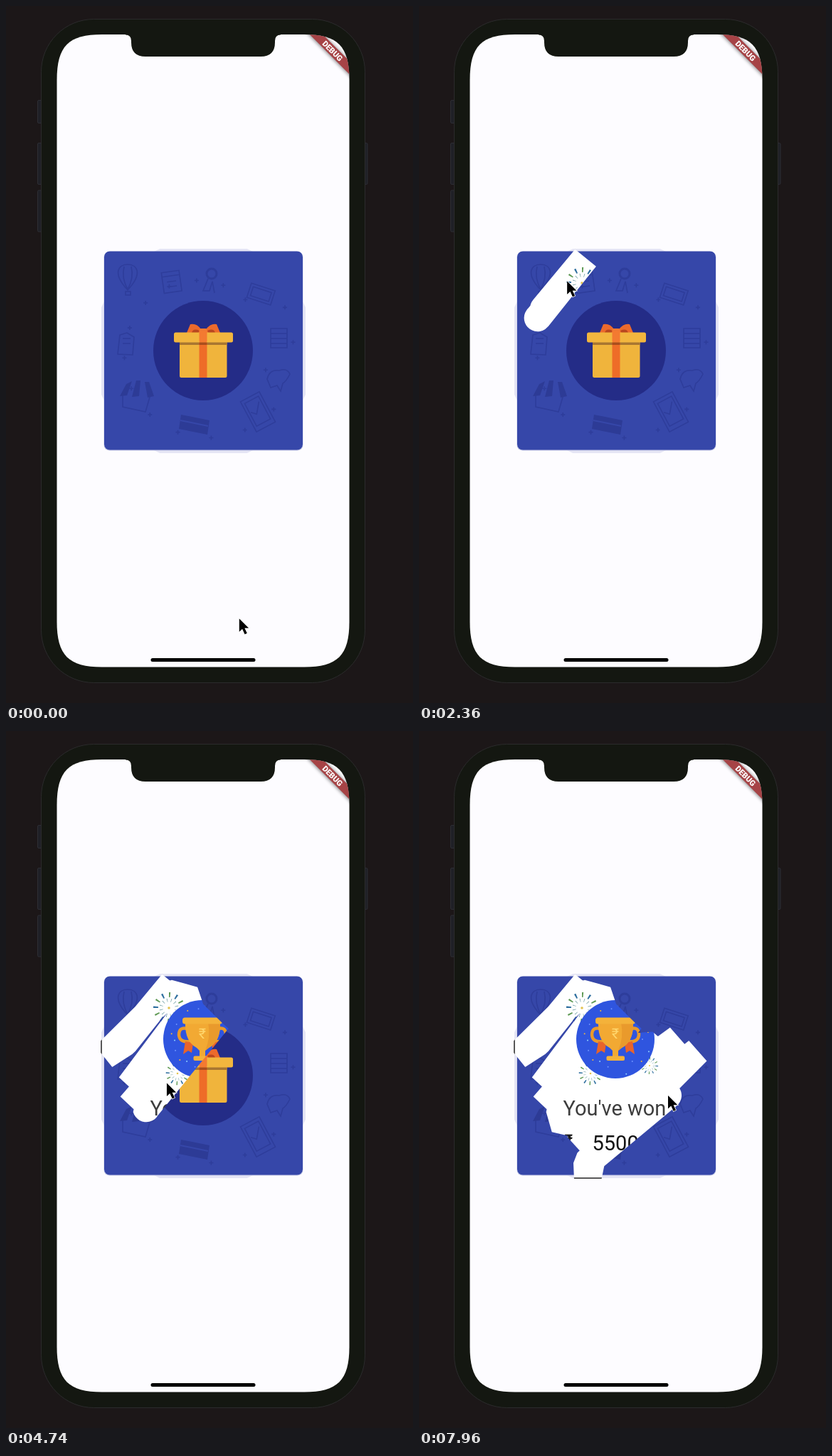
Write an HTML page that moves like this. It is 572x979 px and loops after 8 s.

```html
<!DOCTYPE html>
<html lang="en">
<head>
<meta charset="utf-8">
<title>Scratch card</title>
<style>
  html, body { margin: 0; width: 100%; height: 100%; overflow: hidden; background: #1c1718; }
  svg { display: block; width: 572px; height: 979px; }
  text { font-family: Roboto, "Noto Sans", sans-serif; }
  .line { fill: none; stroke: #2e3d9b; stroke-width: 1.6; }
  .solid { fill: #2d3b96; }
</style>
</head>
<body>
<svg viewBox="0 0 572 979">
  <defs>
    <path id="display" d="M71.500 104C71.500 56 88 40 135 40H419C466 40 482.500 56 482.500 104V865C482.500 912 466 928.500 419 928.500H135C88 928.500 71.500 912 71.500 865Z"/>
    <clipPath id="screen"><use href="#display"/></clipPath>
    <clipPath id="coverBox"><rect x="134" y="341" width="287" height="287"/></clipPath>
    <mask id="scratch" maskUnits="userSpaceOnUse" x="133" y="340" width="289" height="288.500">
      <polyline id="trail" fill="none" stroke="#fff" stroke-width="38" stroke-linecap="round" stroke-linejoin="bevel"/>
    </mask>
    <filter id="soft" x="-30%" y="-100%" width="160%" height="300%"><feGaussianBlur stdDeviation="2.5"/></filter>
    <g id="burst" fill="none" stroke-width="7">
      <circle r="18.5" pathLength="12" stroke="#2f6f9f" stroke-dasharray=".22 1.78"/>
      <circle r="18.5" pathLength="12" stroke="#5f9a55" stroke-dasharray=".2 1.8" stroke-dashoffset="-1"/>
      <circle r="11" pathLength="12" stroke="#7fa9ae" stroke-width="5" stroke-dasharray=".14 .86" stroke-dashoffset="-.5"/>
      <circle r="1.8" fill="#e3c34e"/>
    </g>
  </defs>

  <!-- Phone -->
  <g fill="#1f2026" stroke="#2d2e34">
    <rect x="44.5" y="132.5" width="6" height="32" rx="1.5"/>
    <rect x="44.5" y="192.5" width="6" height="58" rx="1.5"/>
    <rect x="44.5" y="259" width="6" height="58" rx="1.5"/>
    <rect x="502" y="192.5" width="6" height="58" rx="1.5"/>
  </g>
  <rect x="49.5" y="18.5" width="455" height="932" rx="74" fill="#141711" stroke="#2b2b2c"/>
  <use href="#display" fill="#fdfcff"/>
  <g clip-path="url(#screen)">
    <g transform="translate(459 63) rotate(45)">
      <rect x="-50" y="-6.5" width="100" height="14" opacity=".5" filter="url(#soft)"/>
      <rect x="-50" y="-6.5" width="100" height="13" fill="#a64346"/>
      <text y="4" font-size="11" font-weight="900" fill="#fff" text-anchor="middle">DEBUG</text>
    </g>
  </g>
  <path d="M168 39V40.500Q176 40.500 176 49V51Q176 71 196 71H358Q378 71 378 51V49Q378 40.500 386 40.500V39Z" fill="#141711"/>
  <rect x="203.5" y="916" width="147" height="5" rx="2.5"/>

  <!-- Cover -->
  <circle cx="277.5" cy="484.5" r="156" fill="#e5e5f5" clip-path="url(#coverBox)"/>
  <rect x="137.5" y="345" width="280" height="279.5" rx="8" fill="#c3c8e6"/>
  <rect x="138" y="344.5" width="279" height="279" rx="8" fill="#3647a9"/>
  <g class="line">
    <g id="sparks"></g>
    <path d="M171 399C148 374 159 363 171 363S194 374 171 399ZM166 366Q162 382 171 398Q180 382 176 366M168 401H175V406H168Z"/>
    <path transform="rotate(-8 232 386)" d="M220 373H245V402H220ZM220 379H245M226 387H239M226 394H239"/>
    <circle cx="289" cy="376" r="7" stroke-width="3"/>
    <path d="M284 383L277 400 286 400 290 387 293 403"/>
    <path transform="rotate(18 358 404)" d="M341 394H376V415H341ZM345 398H372V411H345Z"/>
    <path d="M372 453H395V480H372ZM372 460H395M372 467H395M372 474H395"/>
    <path d="M157 489L160 462 170 459 180 465 178 490ZM164 467H175M164 474H175"/>
    <path d="M367 524Q370 510 384 512Q395 508 399 517Q394 527 389 530L386 541 381 533 372 536Z"/>
    <path transform="rotate(-28 354 570)" d="M339 546H369V594H339ZM343 551H365V587H343ZM345 566L351 572 362 558"/>
    <path d="M164 543V563L196 570 203 546"/>
  </g>
  <path class="solid" d="M169 531L177 527 170 547 160 548ZM183 526H189L187 548 177 549ZM195 528H201L208 548 199 550ZM246 574L286 582 283 602 243 594Z"/>
  <path d="M245 582L284 590" stroke="#3647a9" stroke-width="2"/>
  <circle cx="277" cy="484" r="70" fill="#242c87"/>
  <path d="M254 459L259 447Q268 445 274 454H281Q288 445 296 447L301 459Z" fill="#ec6a2c"/>
  <path d="M261 459Q263 452 272 456L270 460ZM294 459Q292 452 283 456L285 460Z" fill="#b9471f"/>
  <rect x="244" y="470" width="66.5" height="52" rx="2.5" fill="#f0b43c"/>
  <rect x="244" y="471" width="66.5" height="5" fill="#a87631"/>
  <rect x="271.5" y="472" width="11" height="50" fill="#ee6c28"/>
  <rect x="236" y="458.5" width="83" height="14" rx="2.5" fill="#f2b63e"/>
  <rect x="271.5" y="453" width="11" height="19.5" rx="2" fill="#f37a31"/>
  <rect x="271.5" y="472.5" width="11" height="3.5" fill="#a94d1d"/>

  <!-- Prize -->
  <g mask="url(#scratch)">
    <rect x="134" y="341" width="287" height="287" fill="#fff" stroke="#222" stroke-width="1.5"/>
    <use href="#burst" x="229" y="389"/>
    <use href="#burst" transform="translate(241 481) scale(.74)"/>
    <use href="#burst" transform="translate(324 470) scale(.55)"/>
    <circle cx="276" cy="433" r="55" fill="#2f55df"/>
    <path d="M303 403L314 399 309 411Z" fill="#6a4fd0"/>
    <g id="confetti"></g>
    <path d="M255 418Q243 415 243 427Q244 438 259 436M298 418Q309 415 309 427Q308 438 293 436" fill="none" stroke="#e99a2c" stroke-width="4.5"/>
    <path d="M252 436L263 438 261 452 256 449 249 454ZM300 436L289 438 291 452 296 449 303 454Z" fill="#e8642b"/>
    <path d="M252 409H301Q302 436 285 445L280 449V458H272V449L268 445Q251 436 252 409Z" fill="#f2a933"/>
    <path d="M284 409H301Q302 436 285 445L280 449Q288 430 284 409Z" fill="#e99a2c"/>
    <rect x="248" y="402.5" width="56" height="9" rx="3.5" fill="#f4b23a"/>
    <rect x="263.5" y="456.5" width="25.5" height="6.5" rx="2" fill="#f4b23a"/>
    <text x="276" y="432" font-size="20" fill="#ffd66c" text-anchor="middle">₹</text>
    <text x="202.5" y="540" font-size="29" fill="#3d3d3d">You've won</text>
    <text x="204" y="583" font-size="23" font-weight="700" fill="#1b1b1b">₹</text>
    <text x="243.5" y="588.5" font-size="29" fill="#141414">5500</text>
  </g>

  <path id="cursor" d="M0 0V18.500L4.300 14.500 7.800 22 11 20.500 7.600 13.300H13.300Z" stroke="#fff" stroke-width="1.5" paint-order="stroke"/>
</svg>
<script>
  const LOOP = 8000, CURSOR_LAG = 130;
  // Turning points of the hand: [time, x, y]
  const approach = [[-130, 328, 861], [690, 146, 460]];
  const strokes = [
    [1600, 175, 425], [2150, 234, 354], [2360, 167, 438], [2440, 139, 456],
    [2900, 228, 368], [3050, 264, 378], [3700, 174, 498], [3890, 288, 396],
    [4070, 175, 526], [4290, 298, 406], [4740, 197, 530], [4830, 205, 558],
    [5250, 316, 437], [5330, 335, 453], [5450, 364, 432], [6090, 222, 583],
    [6830, 391, 450], [7350, 236, 606], [7420, 237, 630], [7500, 243, 601], [7830, 350, 512]
  ];
  const hand = [...approach, ...strokes];
  const byId = id => document.getElementById(id);
  const repeat = (count, make) => Array.from({ length: count }, (_, i) => make(i)).join('');

  function positionAt(t) {
    const next = hand.findIndex(([time]) => time > t);
    if (next < 0) return hand.at(-1).slice(1);
    const [t0, x0, y0] = hand[next - 1];
    const [t1, x1, y1] = hand[next];
    const k = (t - t0) / (t1 - t0);
    return [x0 + (x1 - x0) * k, y0 + (y1 - y0) * k];
  }

  function trailAt(t) {
    const passed = strokes.filter(([time]) => time < t).map(([, x, y]) => [x, y]);
    return passed.length ? [...passed, positionAt(t)].join(' ') : '';
  }

  byId('confetti').innerHTML = repeat(18, i => {
    const angle = i * 2.4, radius = 38 + i * 5 % 14;
    const color = ['#6f93ff', '#f2b63e', '#8fd0ff'][i % 3];
    return `<circle cx="${276 + radius * Math.cos(angle)}" cy="${433 + radius * Math.sin(angle)}" r="1" fill="${color}"/>`;
  });

  byId('sparks').innerHTML = repeat(16, i => {
    const angle = i * Math.PI / 8 + .3, radius = 92 + i * 37 % 40;
    const x = 277 + radius * Math.cos(angle), y = 484 + radius * Math.sin(angle);
    return `<path d="M${x - 3} ${y}h6m-3 -3v6"/>`;
  });

  function draw() {
    const t = performance.now() % LOOP;
    byId('trail').setAttribute('points', trailAt(t));
    byId('cursor').setAttribute('transform', `translate(${positionAt(t - CURSOR_LAG)})`);
    requestAnimationFrame(draw);
  }
  draw();
</script>
</body>
</html>
```
